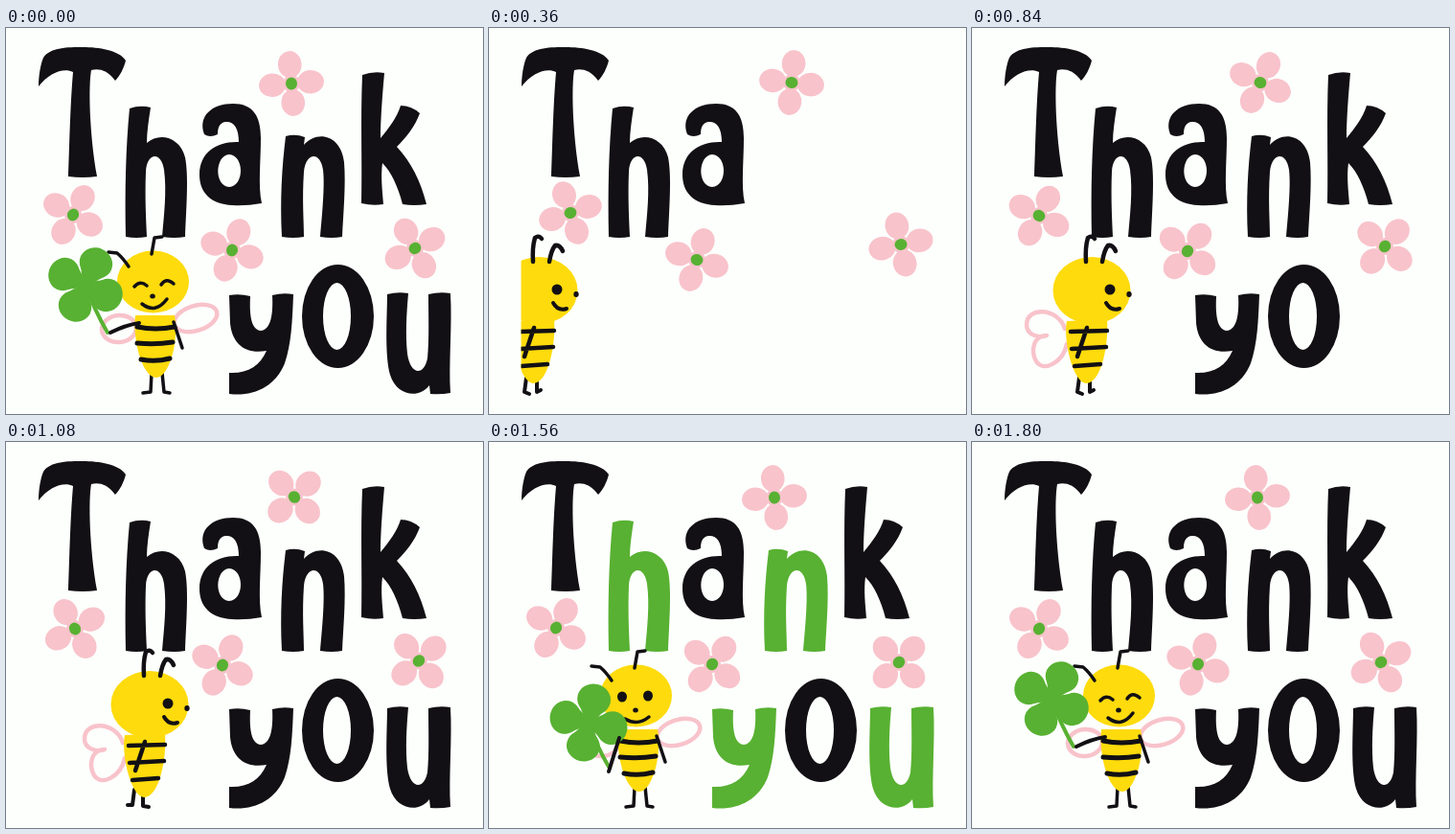
Recreate the animation shown at these times as an HTML page with a canvas. Size 498 px wide and 403 px high, loop 1.92 s.

```html
<!DOCTYPE html>
<html lang="en">
<head>
<meta charset="utf-8">
<title>Thank you</title>
<style>
html, body { margin: 0; width: 100%; height: 100%; overflow: hidden; background: #fdfffc; }
canvas { display: block; }
</style>
</head>
<body>
<canvas id="stage" width="498" height="403" role="img" aria-label="Thank you"></canvas>
<script>
const ctx = document.getElementById('stage').getContext('2d');
const INK = '#121014', GREEN = '#58b132', YELLOW = '#fedb0c', PINK = '#f8c3cb', PAPER = '#fdfffc';
const STEP = 120, STEPS = 16;

const letters = [
  // T h a n k
  'M34 61C34 50 36 38 39 31C46 20 65 20 80 20C97 20 118 23 125 34C123 42 119 50 114 55C106 44 97 42 89 44C86 60 87 110 95 155Q80 157 65 155C66 130 67 80 70 46C60 41 45 47 34 61Z',
  'M129 84Q140 80 151 83C149 96 147 108 147 120C160 108 182 114 187 135C191 155 188 190 187 218Q176 220 163 218C165 195 168 170 165 148C162 128 147 130 146 150C145 175 146 195 147 218Q136 220 125 218C124 170 125 125 129 84Z',
  'M207 111C200 92 215 79 237 79C258 79 266 92 266 115C266 140 263 165 267 183Q250 186 236 185C214 184 202 172 202 153C202 130 220 118 243 119C243 103 237 97 229 98C223 99 221 104 221 111Q213 115 207 111ZM233 132C218 133 217 165 233 166C249 165 249 133 233 132Z',
  'M292 113Q302 110 312 114L311 122C325 106 350 112 353 140C355 165 352 195 351 218Q340 220 328 218C330 195 333 165 331 148C328 128 313 130 311 150C309 180 311 200 311 218Q300 220 288 218C286 180 288 145 292 113Z',
  'M372 49Q383 45 395 47C393 70 391 95 391 115C400 104 408 94 412 81Q423 81 432 89C427 103 418 114 408 124C423 140 433 160 439 184Q426 186 414 184C409 165 402 150 393 141C391 155 393 170 394 184Q383 186 371 183C372 140 370 95 372 49Z',
  // y o u
  'M233 279Q244 277 255 280C254 300 256 315 266 316C277 315 279 298 278 279Q289 276 300 278C299 305 298 330 291 350C281 375 258 385 233 382L233 360C252 361 265 353 272 337C250 341 236 330 234 308Z',
  'M309 301A37.5 54 0 0 1 384 301A37.5 54 0 0 1 309 301ZM331 301A14.5 35 0 0 0 360 301A14.5 35 0 0 0 331 301Z',
  'M398 278Q409 275 420 277C418 300 417 320 419 340C422 362 436 364 440 345C442 325 441 300 441 278Q453 275 464 277C466 310 462 350 464 381Q454 383 443 382L442 373C432 387 408 385 401 362C395 340 398 300 398 278Z'
].map(d => new Path2D(d));

// Letters turned green at a given step
const greens = { 11: [0, 2], 12: [0, 2, 4, 6], 13: [1, 3, 5, 7] };

// Flower poses [x, y, degrees] at these steps
const poseSteps = [3, 5, 7, 11, 13, 15];
const flowers = [
  [[316, 57, 6], [312, 57, 20], [301, 57, 25], [301, 58, 68], [298, 58, 85], [298, 58, 85]],
  [[85, 193, -19], [72, 194, 2], [70, 196, 28], [74, 194, 93], [70, 194, 120], [70, 195, 120]],
  [[217, 242, 18], [222, 233, -10], [225, 233, -52], [227, 233, -76], [233, 232, -52], [236, 232, -70]],
  [[430, 226, -12], [430, 228, -12], [431, 228, -50], [431, 229, -30], [428, 230, -45], [427, 230, -28]]
];
const walkX = [14, 33, 52, 72, 92, 109, 125, 139, 150];

function oval(x, y, rx, ry, fill, angle = 0) {
  ctx.beginPath();
  ctx.ellipse(x, y, rx, ry, angle, 0, 7);
  ctx.fillStyle = fill;
  ctx.fill();
}
function line(d, width = 4, color = INK) {
  ctx.lineWidth = width;
  ctx.strokeStyle = color;
  ctx.stroke(new Path2D(d));
}
function shape(d, fill) {
  ctx.fillStyle = fill;
  ctx.fill(new Path2D(d));
}
function at(x, y, degrees, draw) {
  ctx.save();
  ctx.translate(x, y);
  ctx.rotate(degrees * Math.PI / 180);
  draw();
  ctx.restore();
}

function pose(keys, step) {
  let i = 0;
  while (i < 4 && step > poseSteps[i + 1]) i++;
  const u = (step - poseSteps[i]) / (poseSteps[i + 1] - poseSteps[i]);
  return keys[i].map((v, k) => v + (keys[i + 1][k] - v) * u);
}

function flower(x, y, degrees) {
  at(x, y, degrees, () => {
    for (let i = 0; i < 4; i++) {
      oval(0, -20, 12.3, 14, PINK);
      ctx.rotate(Math.PI / 2);
    }
    oval(0, 0, 9, 9, PINK);
    oval(0, 0, 6.5, 6, GREEN);
  });
}

function clover(x, y, degrees) {
  at(x, y, degrees, () => {
    for (let i = 0; i < 4; i++) {
      oval(0, -25, 17.5, 16, GREEN);
      shape('M-15 -18L0 4L15 -18Z', GREEN);
      ctx.rotate(Math.PI / 2);
    }
  });
}

function walkingBee(x, step) {
  ctx.save();
  ctx.beginPath();
  ctx.rect(33.5, 0, 465, 403);
  ctx.clip();
  ctx.translate(x, 0);
  line('M-28 314C-35 292 -68 290 -68 310C-68 321 -54 324 -47 321C-61 321 -64 337 -58 348C-50 360 -30 349 -26 330', 4.5, PINK);
  line(step % 4 === 1 ? 'M-16 363L-18 379L-23 379M-7 363L-7 380L-1 381'
    : 'M-13 365L-15 380L-10 382M-2 365L-2 380L2 378');
  shape('M-26 306C-30 325 -20 370 -6 371C10 371 18 330 16 304Z', YELLOW);
  line('M-22 317L16 316M-21 335L15 333M-18 353L9 351M-5 313L-15 343', 4.5);
  oval(0, 274, 40.5, 35, YELLOW);
  line('M-6 244Q-7 229 -4 219Q0 216 3 220M11 244Q13 232 17 227Q22 226 25 233', 4.5);
  oval(19, 273, 5.5, 5.5, INK);
  oval(39, 278, 2.7, 3, INK);
  line('M15 287Q20 296 29 293');
  ctx.restore();
}

function frontBee(step) {
  const happy = step >= 14;
  if (step === 11) clover(125, 280, 45);
  // Wings
  ctx.lineWidth = 4.5;
  ctx.strokeStyle = PINK;
  for (const [x, y, rx, ry, a] of [[118, 314, 18, 14, -.1], [198, 303, 23, 13, -.3]]) {
    oval(x, y, rx, ry, PAPER, a);
    ctx.stroke();
  }
  line('M152 360L151 380L143 381M163 360L165 380L171 381', 3.5);
  shape('M135 300C132 325 142 365 157 365C170 365 181 327 176 300Z', YELLOW);
  line('M137 312Q156 316 176 312M137 329Q156 331 174 328M141 346Q156 349 171 345', 5);
  line(step < 13 ? 'M175 307Q180 318 178 332' : 'M175 307L184 334', 3.5);
  if (step < 12) line('M138 307Q132 318 135 331', 3.5);
  // Head
  oval(153.5, 265, 37.5, 32.5, YELLOW);
  line('M128 249Q122 240 116 235L107 234M152 236L155 219L163 218', 3.5);
  if (happy) {
    line('M134 270Q140 263 147 269M162 268Q167 260 175 267', 3.5);
    line('M142 288Q156 299 168 283', 3.5);
  } else {
    oval(139, 266, 5, 5.5, INK);
    oval(166, 265, 5, 5.5, INK);
    line('M142 289Q155 297 167 287', 3.5);
  }
  oval(153, 280, 2.8, 2.5, INK);
  // Clover in hand
  if (step >= 12) {
    const [x, y, tilt, hx, hy] = {
      12: [114, 287, 20, 130, 336], 13: [104, 293, 13, 125, 339], 14: [93, 280, 18, 115, 328]
    }[step] || [83, 268, 26, 106, 318];
    line(`M${x} ${y}Q${x + 9} ${y + 26} ${hx} ${hy}`, 4, GREEN);
    clover(x, y, tilt);
    line(happy ? `M139 308Q125 310 ${hx + 3} ${hy}` : `M136 309L${hx} ${hy + 5}`, 4);
  }
}

function draw(now) {
  const step = Math.floor(now / STEP) % STEPS || 15;
  ctx.fillStyle = PAPER;
  ctx.fillRect(0, 0, 498, 403);
  ctx.lineCap = ctx.lineJoin = 'round';
  letters.slice(0, step).forEach((path, i) => {
    ctx.fillStyle = (greens[step] || []).includes(i) ? GREEN : INK;
    ctx.fill(path, 'evenodd');
  });
  for (const keys of flowers) flower(...pose(keys, step));
  if (step < 10) walkingBee(walkX[step - 1], step);
  else frontBee(step);
  requestAnimationFrame(draw);
}
draw(0);
</script>
</body>
</html>
```
